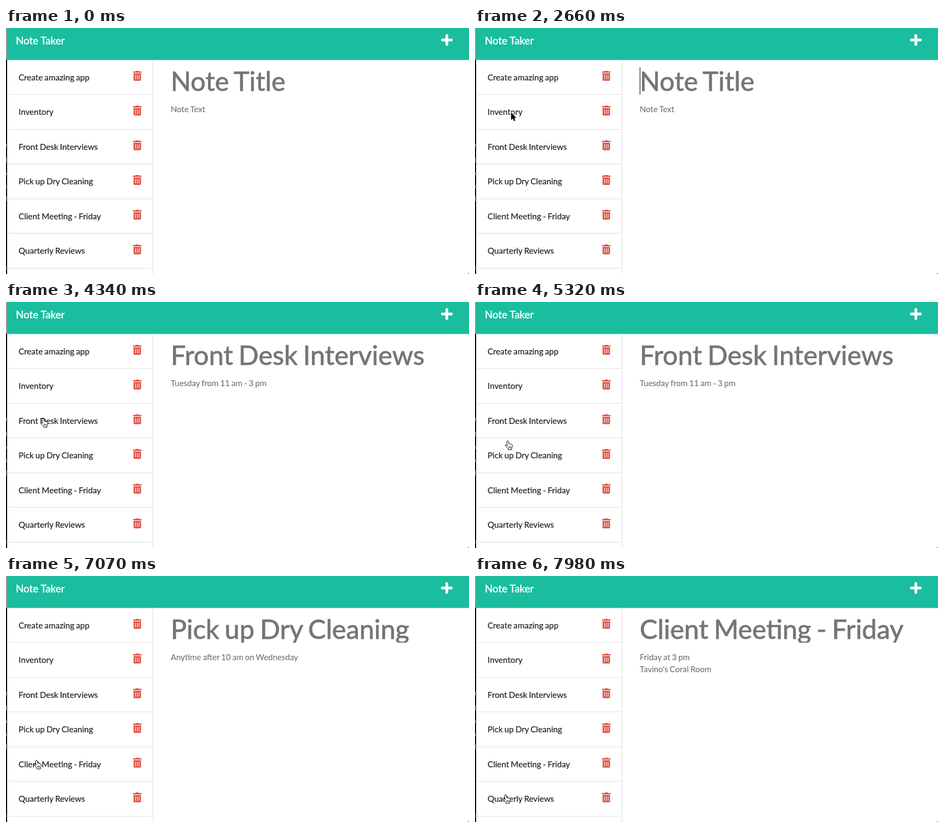
An HTML page for the animation above (8 s loop, 846 px wide and 450 px high).

```html
<!DOCTYPE html>
<html lang="en">
<head>
<meta charset="utf-8">
<title>Note Taker</title>
<style>
  html, body { margin: 0; width: 100%; height: 100%; overflow: hidden; background: #fff; }
  svg { display: block; font-family: Lato, sans-serif; }
  text { word-spacing: -.05em; }
  .brand { font-size: 18.75px; fill: #fff; stroke: #fff; stroke-width: .45px; word-spacing: 0; }
  .item { font-size: 15.2px; fill: #212121; stroke: #212121; stroke-width: .2px; }
  .title { font-size: 48.6px; fill: #757575; stroke: #757575; stroke-width: .8px; }
  .body { font-size: 15px; fill: #757575; stroke: #757575; stroke-width: .15px; }
</style>
</head>
<body>
<svg width="846" height="450" viewBox="0 0 846 450">
  <defs>
    <path id="trash" transform="scale(.03516)" fill="#dd4f42" d="M32 464a48 48 0 0 0 48 48h288a48 48 0 0 0 48-48V128H32zm272-256a16 16 0 0 1 32 0v224a16 16 0 0 1-32 0zm-96 0a16 16 0 0 1 32 0v224a16 16 0 0 1-32 0zm-96 0a16 16 0 0 1 32 0v224a16 16 0 0 1-32 0zM432 32H312l-9.4-18.7A24 24 0 0 0 281.1 0H166.8a23.7 23.7 0 0 0-21.4 13.3L136 32H16A16 16 0 0 0 0 48v32a16 16 0 0 0 16 16h416a16 16 0 0 0 16-16V48a16 16 0 0 0-16-16z"/>
    <clipPath id="field"><path d="M301 72h540v50H301z"/></clipPath>
  </defs>

  <path d="M0 0h2v450H0z"/>
  <path d="M0 0h2v58H0z" fill="#999"/>
  <path d="M0 212h1v6H0zM0 237h1v9H0zM0 264h1v5H0zM0 288h1v5H0zM0 308h1v9H0z" fill="#aaa"/>
  <path d="M0 435h1v7H0z" fill="#3a6fc4"/>
  <path d="M2 0h844v58.500H2z" fill="#1abd9e"/>
  <text class="brand" x="18" y="29.5">Note Taker</text>
  <g fill="#fff">
    <rect x="795" y="19.5" width="21" height="5" rx="1.4"/>
    <rect x="803" y="11.5" width="5" height="21" rx="1.4"/>
  </g>
  <path d="M268 59h1v391h-1z" fill="#dfdfdf"/>
  <path d="M846 447v3h-3q2.500 0 3-3z" fill="#333"/>
  <g id="list"></g>

  <text class="title" id="title" x="301" y="115" clip-path="url(#field)"></text>
  <text class="body" id="line1" x="301" y="154"></text>
  <text class="body" id="line2" x="301" y="176"></text>
  <path id="caret" d="M301 72h1v50h-1z"/>

  <path id="arrow" d="M0 0V13.800L3.200 10.900 5.300 15.800 7.700 14.800 5.600 10H9.800Z" stroke="#fff" stroke-width="1.200" paint-order="stroke"/>
  <g id="hand" fill="#fff" stroke="#000" stroke-linejoin="round" stroke-linecap="round">
    <path d="M5 1.300C6 .6 7 1.300 7.200 2.300L8 6.500C8.600 5.700 10 5.900 10.400 7 11.200 6.500 12.200 6.900 12.500 7.900 13.500 7.500 14.300 8.200 14.400 9.200 14.500 11.500 13.500 13.500 13 14.600V17H6.500V15.500C5.800 14 3.200 12.300 1.600 10 1 8.900 2 7.900 3.200 8.600L5 10.200 3.900 3.400C3.700 2.500 4.200 1.600 5 1.300Z"/>
    <path d="M7.700 11.300V14M9.600 11.300V14M11.500 11.300V14" stroke-width=".8"/>
  </g>
</svg>
<script>
const LOOP = 8000, STEP = 70, ROW = 63.5;
const $ = id => document.getElementById(id);

const items = ["Create amazing app", "Inventory", "Front Desk Interviews",
  "Pick up Dry Cleaning", "Client Meeting - Friday", "Quarterly Reviews"];

$("list").innerHTML = items.map((name, i) => {
  const y = ROW * i;
  const right = i === items.length - 1 ? 266 : 268;
  return `<text class="item" x="23" y="${95.75 + y}">${name}</text>
    <use href="#trash" transform="translate(232 ${78.4 + y})"/>
    <path d="M3 ${Math.floor(121.5 + y)}H${right}v1H3z" fill="#dfdfdf"/>`;
}).join("");

// Shown notes: start time, title, text lines
const notes = [
  [0, "Note Title", "Note Text"],
  [2800, items[1], "Count stock every Monday"],
  [4340, items[2], "Tuesday from 11 am - 3 pm"],
  [5880, items[3], "Anytime after 10 am on Wednesday"],
  [7140, items[4], "Friday at 3 pm", "Tavino's Coral Room"],
];

// Pointer tip: start time, end time, from x, y, to x, y
const ENTER = 840, CLICK = 2800;
const moves = [
  [ENTER, 1050, 62, 436, 42.5, 144],
  [1120, 1330, 42.5, 144, 66, 154.5],
  [3360, 3710, 66, 155, 67, 212],
  [4970, 5530, 67, 212, 55.5, 272],
  [6510, 6930, 55.5, 272, 55, 336],
  [7770, 7980, 55, 336, 54.5, 399],
];
const caretOn = [[1610, 2100], [2660, CLICK]];

const show = (id, on) => $(id).setAttribute("visibility", on ? "visible" : "hidden");
const place = (id, x, y) => $(id).setAttribute("transform", `translate(${x} ${y})`);
const latest = (list, t) => list.filter(e => e[0] <= t).pop();

function draw(time) {
  const t = Math.floor((time % LOOP) / STEP) * STEP;

  const [, title, line1, line2 = ""] = latest(notes, t);
  $("title").textContent = title;
  $("line1").textContent = line1;
  $("line2").textContent = line2;
  show("caret", caretOn.some(([a, b]) => t >= a && t < b));

  show("arrow", t >= ENTER && t < CLICK);
  show("hand", t >= CLICK);
  const [a, b, x0, y0, x1, y1] = latest(moves, t) || moves[0];
  const p = Math.min(1, Math.max(0, (t - a) / (b - a)));
  const ease = p * p * (3 - 2 * p);
  const x = x0 + (x1 - x0) * ease, y = y0 + (y1 - y0) * ease;
  place("arrow", x, y);
  place("hand", Math.round(x - 5), Math.round(y));
}

const start = performance.now();
function tick() {
  draw(performance.now() - start);
  requestAnimationFrame(tick);
}
tick();
</script>
</body>
</html>
```
